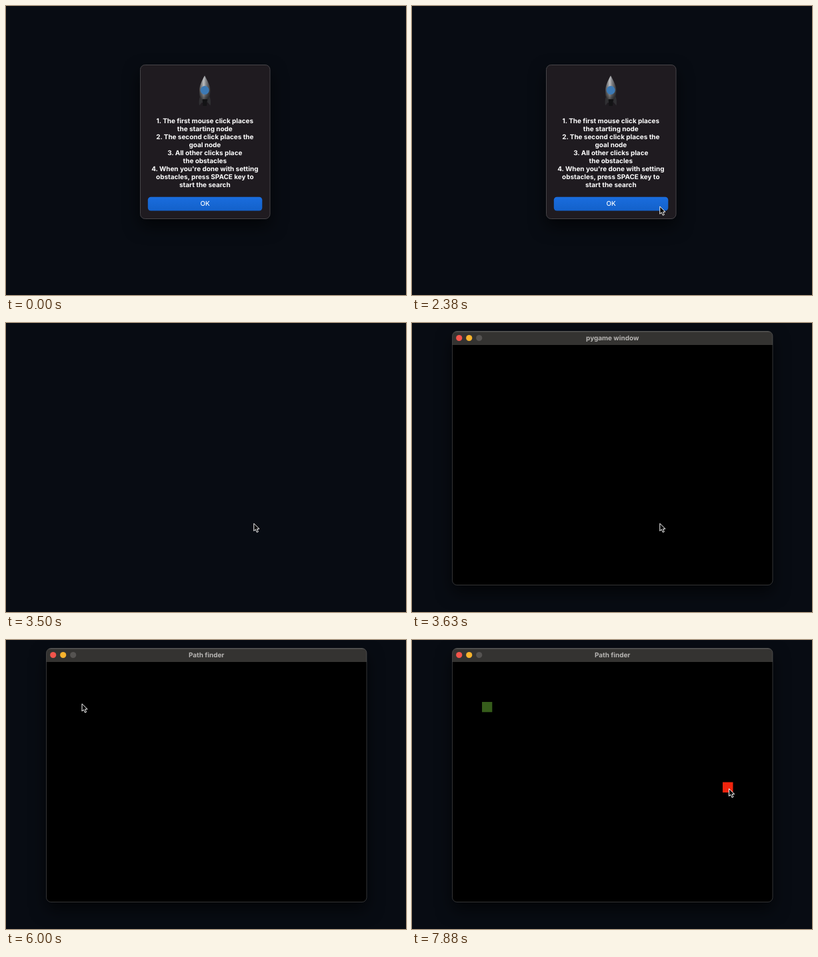
These frames come from a looping animation (600 by 434 pixels, 8000 ms). An HTML page:

```html
<!DOCTYPE html>
<html lang="en">
<head>
<meta charset="utf-8">
<title>Path finder</title>
<style>
  html, body { margin: 0; width: 100%; height: 100%; overflow: hidden; background: #080c13; }
  svg { display: block; width: 100%; height: 100%; }
  text { font-family: Inter, "Liberation Sans", sans-serif; text-anchor: middle; text-rendering: geometricPrecision; }
  .bold { font-weight: 700; font-size: 9.95px; }
  .shadow { filter: drop-shadow(0 11px 12px rgba(0, 0, 0, .62)); }
</style>
</head>
<body>
<svg viewBox="0 0 600 434" xmlns="http://www.w3.org/2000/svg">
  <defs>
    <linearGradient id="blue" x2="0" y2="1">
      <stop stop-color="#1a6dde"/><stop offset="1" stop-color="#1361ca"/>
    </linearGradient>
    <linearGradient id="metal">
      <stop stop-color="#48494c"/><stop offset=".4" stop-color="#bdbec0"/>
      <stop offset=".6" stop-color="#808185"/><stop offset="1" stop-color="#333437"/>
    </linearGradient>
    <linearGradient id="shade" x2="0" y2="1">
      <stop offset=".5" stop-opacity="0"/><stop offset="1" stop-opacity=".75"/>
    </linearGradient>
    <path id="hull" d="M298 104.500C294 112 290 120 290 127C290 134 291.500 140 293.500 144.500H302.500C304.500 140 306.500 134 306.500 127C306.500 120 302 112 298 104.500Z"/>
    <clipPath id="frame"><rect x="60.500" y="12.500" width="480.500" height="381" rx="7"/></clipPath>
  </defs>
  <rect width="600" height="434" fill="#080c13"/>

  <g id="dialog">
    <rect class="shadow" x="201.500" y="88.500" width="194.500" height="231" rx="7" fill="#1f1b20" stroke="#474549"/>
    <use href="#hull" fill="url(#metal)"/>
    <use href="#hull" fill="url(#shade)"/>
    <path d="M291.500 135Q288.500 142 290 149.500L294.500 144H302L306.500 149.500Q308 142 305 135L302 143H294.500Z" fill="#303033"/>
    <path d="M294.500 140H302L301 150H295.500Z" fill="#131315"/>
    <circle cx="298.200" cy="126.500" r="6.500" fill="#3c79b4"/>
    <g id="lines" class="bold" fill="#fff"></g>
    <rect x="212.800" y="286.700" width="171.500" height="20.800" rx="4.500" fill="url(#blue)"/>
    <text x="298.500" y="300.300" font-size="9.800" font-weight="500" fill="#fff">OK</text>
  </g>

  <g id="window">
    <rect class="shadow" x="60.500" y="12.500" width="480.500" height="381" rx="7" fill="#000"/>
    <g clip-path="url(#frame)">
      <rect x="60" y="12" width="482" height="21" fill="#343331"/>
      <rect x="60" y="12" width="482" height="1.500" fill="#5b5a58"/>
    </g>
    <rect x="60.500" y="12.500" width="480.500" height="381" rx="7" fill="none" stroke="#7d7d7d" stroke-opacity=".4"/>
    <g id="lights"></g>
    <text id="title" class="bold" x="300.700" y="25.600" fill="#b7b5b3"></text>
    <rect id="start" x="105" y="93" width="15.300" height="15.300" fill="#365d1b"/>
    <rect id="goal" x="466" y="213.500" width="15.500" height="15.500" fill="#f0240d"/>
  </g>

  <path id="cursor" d="M.5 .8V12L3 9.700L5 14L7 13.100L5.100 8.900H8.700Z" fill="#000" stroke="#fff" stroke-linejoin="round"/>
</svg>
<script>
const LOOP = 8000, STEP = 125;
const $ = id => document.getElementById(id);

function add(parent, tag, attrs, text = "") {
  const el = document.createElementNS("http://www.w3.org/2000/svg", tag);
  for (const key in attrs) el.setAttribute(key, attrs[key]);
  el.textContent = text;
  parent.append(el);
}

[
  "1. The first mouse click places", "the starting node",
  "2. The second click places the", "goal node",
  "3. All other clicks place", "the obstacles",
  "4. When you're done with setting", "obstacles, press SPACE key to", "start the search"
].forEach((line, i) => add($("lines"), "text", { x: 298.3, y: 176 + 12 * i }, line));

["#f3544b", "#f8b32d", "#555351"].forEach((fill, i) =>
  add($("lights"), "circle", { cx: 70.7 + 15 * i, cy: 22.5, r: 4.6, fill }));

// The pointer rests between eased moves
const appear = 1000, origin = { x: 372, y: 362 };
const moves = [
  { from: 1000, to: 1750, x: 371.3, y: 300.3 },  // OK button
  { from: 3750, to: 4375, x: 348, y: 307 },
  { from: 5000, to: 5375, x: 145, y: 151 },
  { from: 5500, to: 6000, x: 113.5, y: 95 },     // start node
  { from: 6250, to: 6625, x: 480.5, y: 343.5 },
  { from: 6875, to: 7000, x: 472, y: 335 },
  { from: 7000, to: 7250, x: 460, y: 230 },
  { from: 7375, to: 7750, x: 475, y: 222.5 }     // goal node
];

const progress = (t, from, to) => Math.min(1, Math.max(0, (t - from) / (to - from)));
const ease = f => f * f * (3 - 2 * f);

function pointerAt(t) {
  let { x, y } = origin;
  for (const m of moves) {
    const f = ease(progress(t, m.from, m.to));
    x += (m.x - x) * f;
    y += (m.y - y) * f;
  }
  return [x, y];
}

const show = (id, on) => $(id).setAttribute("visibility", on ? "inherit" : "hidden");

function draw(ms) {
  const t = Math.floor(ms / STEP) * STEP;  // 8 steps a second

  $("dialog").setAttribute("opacity", 1 - progress(t, 3125, 3500));
  show("window", t >= 3625);
  $("title").textContent = t < 3750 ? "pygame window" : "Path finder";
  show("start", t >= 6125);
  show("goal", t >= 7875);

  show("cursor", t >= appear);
  $("cursor").setAttribute("transform", `translate(${pointerAt(t)})`);
}

function tick() {
  draw(performance.now() % LOOP);
  requestAnimationFrame(tick);
}
tick();
</script>
</body>
</html>
```
